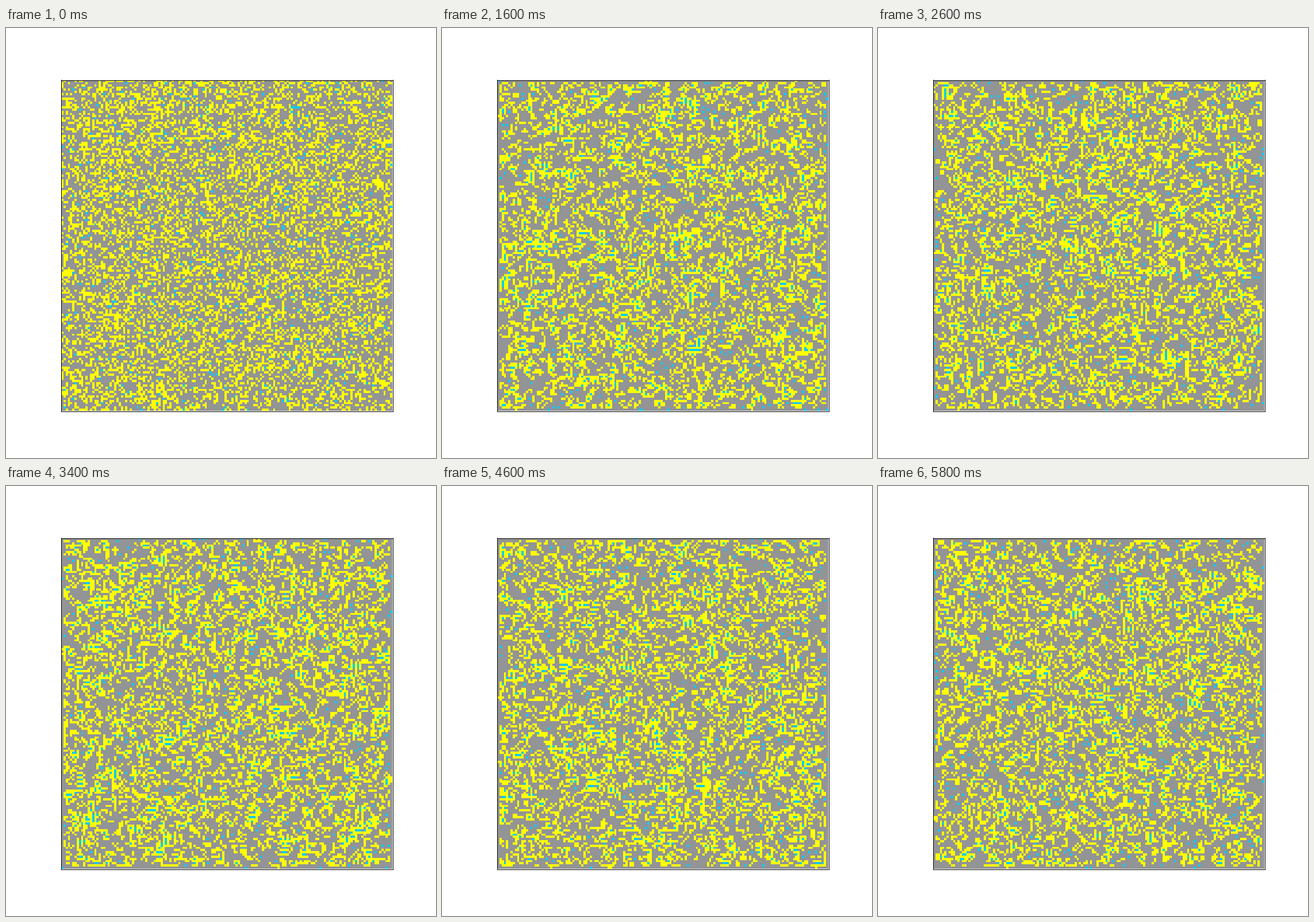
These frames come from a looping animation (748x748 px, 6 s). A matplotlib script:

```python
import numpy as np
import matplotlib.pyplot as plt
from matplotlib.animation import FuncAnimation
from matplotlib.colors import ListedColormap

STAGE, DPI = 748, 100
N = 150                      # cells per side
FRAMES, INTERVAL = 30, 200
DENSITY = 0.33               # share of live cells the colony settles at
GREY, YELLOW, CYAN = 0, 1, 2

rng = np.random.default_rng(12)
edge = np.ones((N, N), bool)
edge[1:-1, 1:-1] = False


def neighbours(live):
    p = np.pad(live.astype(int), 1)
    return sum(p[1 + dy:N + 1 + dy, 1 + dx:N + 1 + dx]
               for dy in (-1, 0, 1) for dx in (-1, 0, 1) if dy or dx)


def step(live):
    """Life with surviving loners; line ends and knots survive by chance."""
    n = neighbours(live)
    chance = np.clip(0.3 + 5 * (DENSITY - live.mean()), 0, 1)
    lucky = rng.random((N, N)) < chance
    stay = np.isin(n, (0, 2, 3)) | (np.isin(n, (1, 4)) & lucky)
    new = np.where(live, stay, n == 3)
    return new & (~edge | (rng.random((N, N)) < 0.12))


def paint(live):
    """Loners and crowded gaps are cyan, other live cells yellow."""
    n = neighbours(live)
    cells = np.where(live, YELLOW, GREY)
    cells[live & (n == 0)] = CYAN
    cells[~live & (n >= 6)] = CYAN
    cells[edge & (n == 0) & (rng.random((N, N)) < 0.05)] = CYAN
    return cells


def history():
    start = rng.choice(3, size=(N, N), p=(0.632, 0.35, 0.018))
    states, live = [start, start], start == YELLOW
    while len(states) < FRAMES:
        live = step(live)
        states.append(paint(live))
    return states


states = history()

fig = plt.figure(figsize=(STAGE / DPI, STAGE / DPI), dpi=DPI, facecolor="white")
ax = fig.add_axes([96.5 / STAGE, 1 - 666.5 / STAGE, 576 / STAGE, 576 / STAGE])
ax.set(xticks=[], yticks=[])
for spine in ax.spines.values():
    spine.set(linewidth=0.72, color="black")

image = ax.imshow(states[0], cmap=ListedColormap(["#929496", "#ffff00", "#00ccff"]),
                  vmin=0, vmax=2, interpolation="nearest", aspect="auto")


def update(i):
    image.set_data(states[i % FRAMES])
    return [image]


anim = FuncAnimation(fig, update, frames=FRAMES, interval=INTERVAL,
                     repeat=True, repeat_delay=0, blit=False)
plt.show()
```
